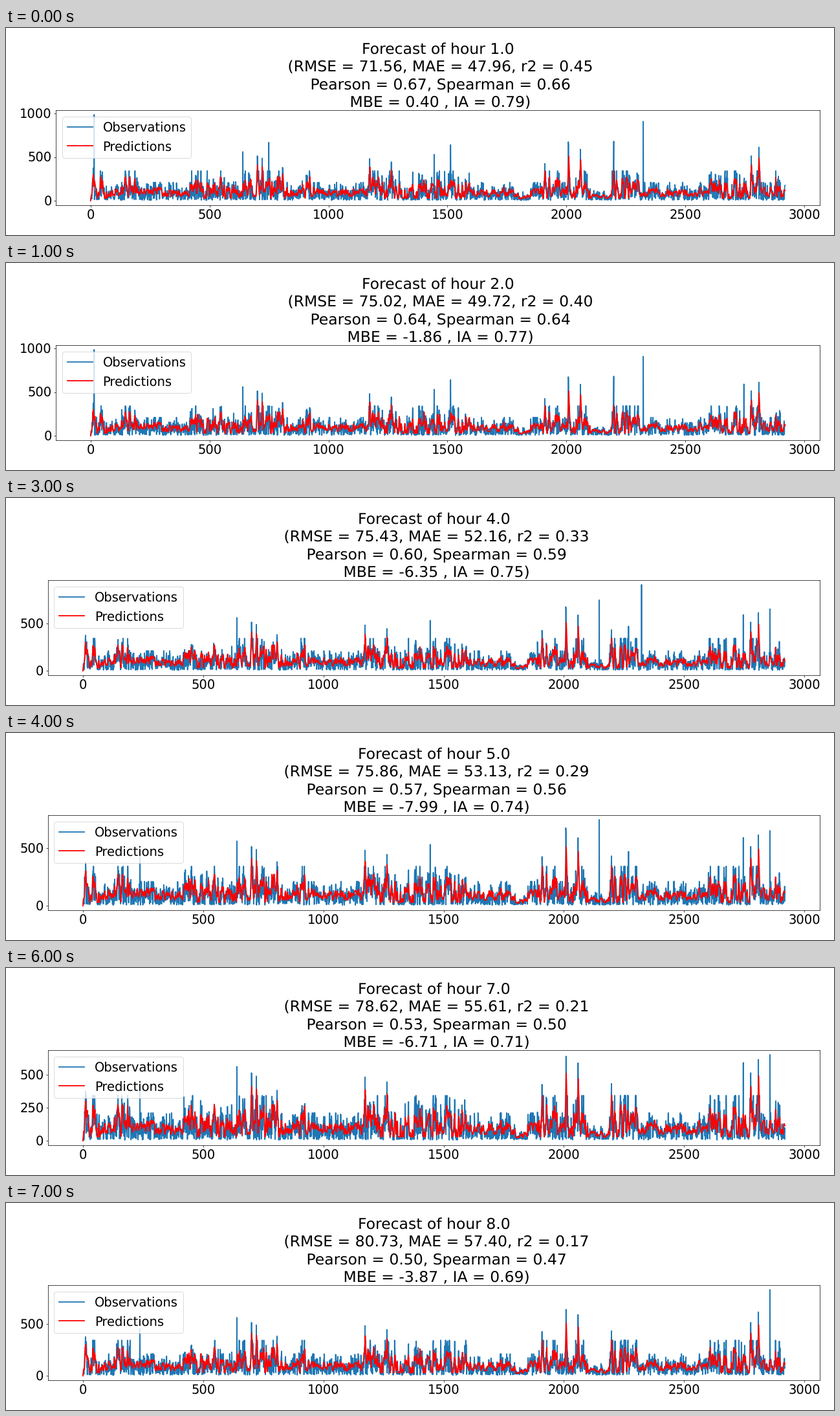
Animation, 1280 px wide and 320 px high, one loop 8000 ms. Source, as a matplotlib script:

```python
import matplotlib.pyplot as plt
import numpy as np
from matplotlib.animation import FuncAnimation

W, H, DPI = 1280, 320, 64
N = 2920
plt.rcParams.update({
    "font.family": "DejaVu Sans",
    "font.size": 22,
    "text.hinting": "none",
    "lines.linewidth": 2,
})

# Title text: RMSE, MAE, r2, Pearson, Spearman, MBE, IA for each lead hour
SCORES = [
    (71.56, 47.96, 0.45, 0.67, 0.66, 0.40, 0.79),
    (75.02, 49.72, 0.40, 0.64, 0.64, -1.86, 0.77),
    (76.88, 51.05, 0.36, 0.61, 0.62, -3.94, 0.75),
    (75.43, 52.16, 0.33, 0.60, 0.59, -6.35, 0.75),
    (75.86, 53.13, 0.29, 0.57, 0.56, -7.99, 0.74),
    (76.80, 53.90, 0.25, 0.55, 0.54, -8.73, 0.72),
    (78.62, 55.61, 0.21, 0.53, 0.50, -6.71, 0.71),
    (80.73, 57.40, 0.17, 0.50, 0.47, -3.87, 0.69),
]

# Spans of samples with strong swings, and with very low values
BUSY = [(0, 70), (130, 200), (420, 680), (698, 830), (890, 925),
        (1168, 1490), (1505, 1600), (1890, 1930), (1950, 1975),
        (2000, 2100), (2190, 2310), (2600, 2815), (2880, 2905)]
LULLS = [(1800, 1850), (2100, 2190)]

# Highest predictions: sample, height
PEAKS = [(12, 300), (702, 410), (722, 390), (808, 305), (1174, 385),
         (1265, 355), (1910, 340), (2010, 510), (2060, 470), (2199, 345),
         (2778, 410), (2810, 490)]

# Observed spikes that were not predicted: sample, height, first and last hour
SPIKES = [(15, 984, 1, 3), (237, 450, 5, 8), (640, 560, 1, 8),
          (749, 667, 1, 1), (1444, 530, 1, 5), (1513, 640, 1, 3),
          (2008, 673, 1, 6), (2147, 745, 3, 5), (2199, 680, 1, 3),
          (2269, 470, 3, 6), (2323, 907, 1, 4), (2746, 590, 2, 7),
          (2857, 650, 3, 7), (2857, 828, 8, 8)]

x = np.arange(N)
level = np.full(N, 145.0)
floor = np.full(N, 50.0)
for spans, high, low in ((BUSY, 250, 30), (LULLS, 70, 25)):
    for start, end in spans:
        level[start:end] = high
        floor[start:end] = low

shared = np.random.default_rng(7)
shared_noise = shared.normal(0, 1, N)
weather = np.convolve(shared.normal(0, 1, N), np.hanning(13), "same")
weather /= weather.std()


def predictions(rng):
    """Slow weather swings plus a daily cycle of eight samples."""
    daily = np.sin(2 * np.pi * x / 8)
    gain = 0.45 + 0.28 * weather + 0.15 * daily + 0.06 * rng.normal(0, 1, N)
    y = floor + (level - floor) * np.clip(gain, 0, 1.1)
    for at, top in PEAKS:
        y = np.maximum(y, top * (1 - np.abs(x - at) / 7))
    return y * np.minimum(1, x / 8)


def observations(hour, pred, rng):
    noise = 0.8 * shared_noise + 0.6 * rng.normal(0, 1, N)
    y = np.minimum(pred * (1 + 0.5 * noise) - 8, 1.25 * level + 30)
    y = np.maximum(y, rng.uniform(6, 18, N))
    for at, top in PEAKS:
        y[at - 1] = 1.25 * top
    for at, top, first, last in SPIKES:
        if first <= hour <= last:
            y[at] = top
    return y


def make_series(hour):
    rng = np.random.default_rng(100 + hour)
    pred = predictions(rng)
    return observations(hour, pred, rng), pred


def make_title(hour):
    rmse, mae, r2, pearson, spearman, mbe, ia = SCORES[hour - 1]
    return (f"Forecast of hour {hour:.1f}\n"
            f" (RMSE = {rmse:.2f}, MAE = {mae:.2f}, r2 = {r2:.2f}\n"
            f" Pearson = {pearson:.2f}, Spearman = {spearman:.2f}\n"
            f" MBE = {mbe:.2f} , IA = {ia:.2f})")


def place(left, right, top=127.3, bottom=273.9):
    ax.set_position([left / W, 1 - bottom / H,
                     (right - left) / W, (bottom - top) / H])


fig = plt.figure(figsize=(W / DPI, H / DPI), dpi=DPI, facecolor="white")
ax = fig.add_axes([0.06, 0.15, 0.92, 0.45])
obs_line, = ax.plot([], [], color="tab:blue", label="Observations")
pred_line, = ax.plot([], [], color="red", label="Predictions")
ax.set_xlim(-0.05 * (N - 1), 1.05 * (N - 1))
ax.set_xticks(range(0, 3001, 500))
ax.legend(loc="upper left")


def update(i):
    hour = i + 1
    obs, pred = make_series(hour)
    obs_line.set_data(x, obs)
    pred_line.set_data(x, pred)
    peak = obs.max()
    ax.set_ylim(-0.05 * peak, 1.05 * peak)
    step = 250 if peak < 700 else 500
    ax.set_yticks(np.arange(0, 1.05 * peak, step).astype(int))
    # Four-digit tick labels need a wider left margin
    if 1.05 * peak >= 1000:
        place(77.1, 1258)
    else:
        place(64.7, 1258.3)
    ax.set_title(make_title(hour), linespacing=1.29)
    return obs_line, pred_line


anim = FuncAnimation(fig, update, frames=len(SCORES), interval=1000,
                     repeat=True, repeat_delay=0, blit=False)
plt.show()
```
